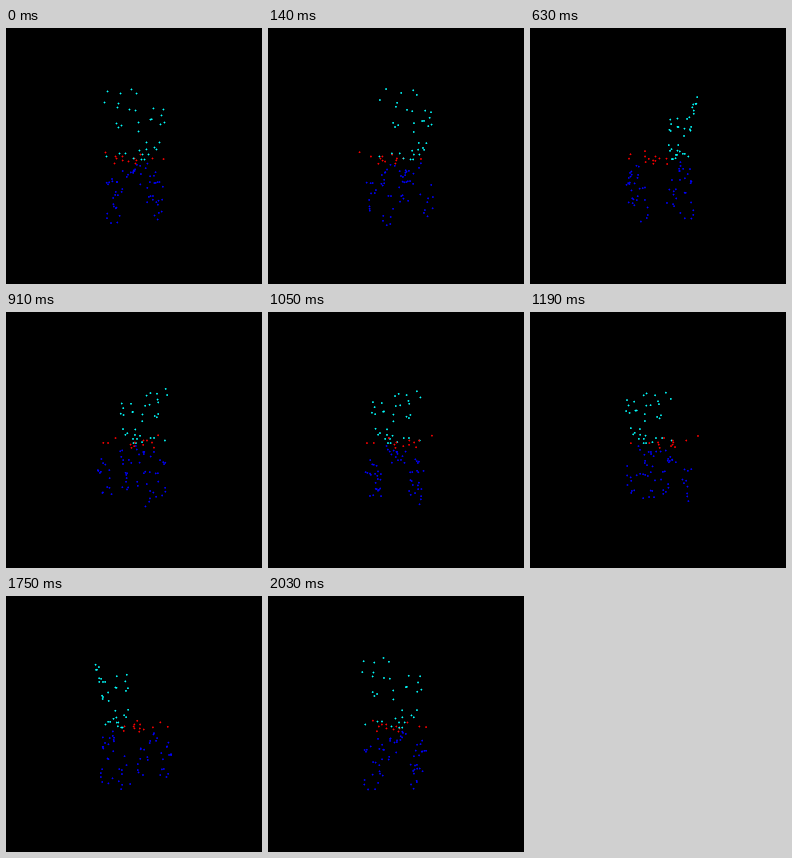
Recreate the animation shown at these times as a matplotlib script. Size 256 by 256 pixels, loop 2100 ms.

```python
import numpy as np
import matplotlib.pyplot as plt
from matplotlib.animation import FuncAnimation

SIZE, FRAMES, INTERVAL = 256, 30, 70
MID = 128       # screen position of the turning axis and the horizon
DIST = 222      # camera distance
RADIUS = 1.28   # splat radius in pixels
CYAN, RED, BLUE = (0, 1, 1), (1, 0, 0), (0, 0, 1)

# x to the right, y down, z towards the viewer
BACK = np.array([
    (-23.2, -56, 30.9), (-11.7, -52.8, 36), (-2.5, -55, 39.9),
    (1.7, -52.1, 38.3), (-26.6, -47.9, 25), (-13.7, -45.3, 32.1),
    (-14.6, -42, 31.6), (-4.3, -40.2, 31.9), (.9, -39.4, 31.8),
    (16.6, -42.1, 27.5), (26, -42.2, 22.6), (24.2, -36.8, 23),
    (3.5, -29.4, 30), (14, -32.5, 26.5), (15, -32.5, 28),
    (27, -30.6, 22), (23.4, -28.9, 22), (-15.7, -28.8, 28.3),
    (-14, -25.3, 28.4), (-11.3, -26.9, 29.1), (3.5, -21.7, 29.5),
    (10.6, -12.4, 26), (22.8, -12.8, 19.5), (10.6, -6.3, 25),
    (18.1, -8.1, 21), (20, -6.4, 20), (-13.6, -2.7, 20.4),
    (-8, -2.7, 25), (-25.4, 0, 20.6), (4.4, -5.3, 25),
    (7.2, -1.8, 23), (12.5, -1.8, 24), (-.9, 1.8, 18),
    (6.4, 2.8, 18), (9.2, 2.8, 18),
])
SEAT = np.array([
    (-31.9, -4.4, -22.2), (-20.6, 0, -19.2), (-12.4, 0, -7),
    (6.7, -2.2, -27), (-17.8, 2, 2), (-19.8, 6.9, 2),
    (-12.2, 4.1, -7), (-6.4, 5.3, -15), (0, 2, 1), (2, 4, -5),
    (1, 7.2, -5), (20.1, 2.2, -26), (29.3, 2.6, -2),
])


def make_legs(seed=4):
    """Scatter points over a front and a back rail and four legs."""
    rng = np.random.default_rng(seed)
    parts = []
    for side in (-1, 1):
        n = 14
        parts.append(np.column_stack([
            rng.uniform(-29, 29, n),
            rng.uniform(6, 29, n),
            side * 24 + rng.uniform(-6, 6, n)]))
        for hand in (-1, 1):
            n = 8
            parts.append(np.column_stack([
                hand * 19 + rng.uniform(-6, 6, n),
                rng.uniform(27, 60, n),
                side * 23 + rng.uniform(-6, 6, n)]))
    return np.vstack(parts)


LEGS = make_legs()
POINTS = np.vstack([BACK, SEAT, LEGS])
COLORS = np.repeat([CYAN, RED, BLUE],
                   [len(BACK), len(SEAT), len(LEGS)], axis=0).astype(float)


def project(angle):
    x, y, z = POINTS.T
    c, s = np.cos(angle), np.sin(angle)
    depth = z * c - x * s
    scale = DIST / (DIST - depth)
    return MID + scale * (x * c + z * s), MID + scale * y, depth


def render(angle):
    img = np.zeros((SIZE, SIZE, 3))
    px, py, depth = project(angle)
    for i in np.argsort(depth):
        col, row = int(round(px[i])), int(round(py[i]))
        ys, xs = np.mgrid[row - 2:row + 3, col - 2:col + 3]
        dist2 = (xs - px[i]) ** 2 + (ys - py[i]) ** 2
        alpha = np.clip(1 - dist2 / RADIUS ** 2, 0, 1)[..., None]
        img[ys, xs] = img[ys, xs] * (1 - alpha) + COLORS[i] * alpha
    return img


fig = plt.figure(figsize=(SIZE / 100, SIZE / 100), dpi=100, facecolor="black")
ax = fig.add_axes([0, 0, 1, 1])
ax.axis("off")
view = ax.imshow(render(0), interpolation="nearest", aspect="auto")


def update(frame):
    view.set_data(render(2 * np.pi * frame / FRAMES))
    return [view]


anim = FuncAnimation(fig, update, frames=FRAMES, interval=INTERVAL,
                     repeat=True, repeat_delay=0, blit=False)
plt.show()
```
